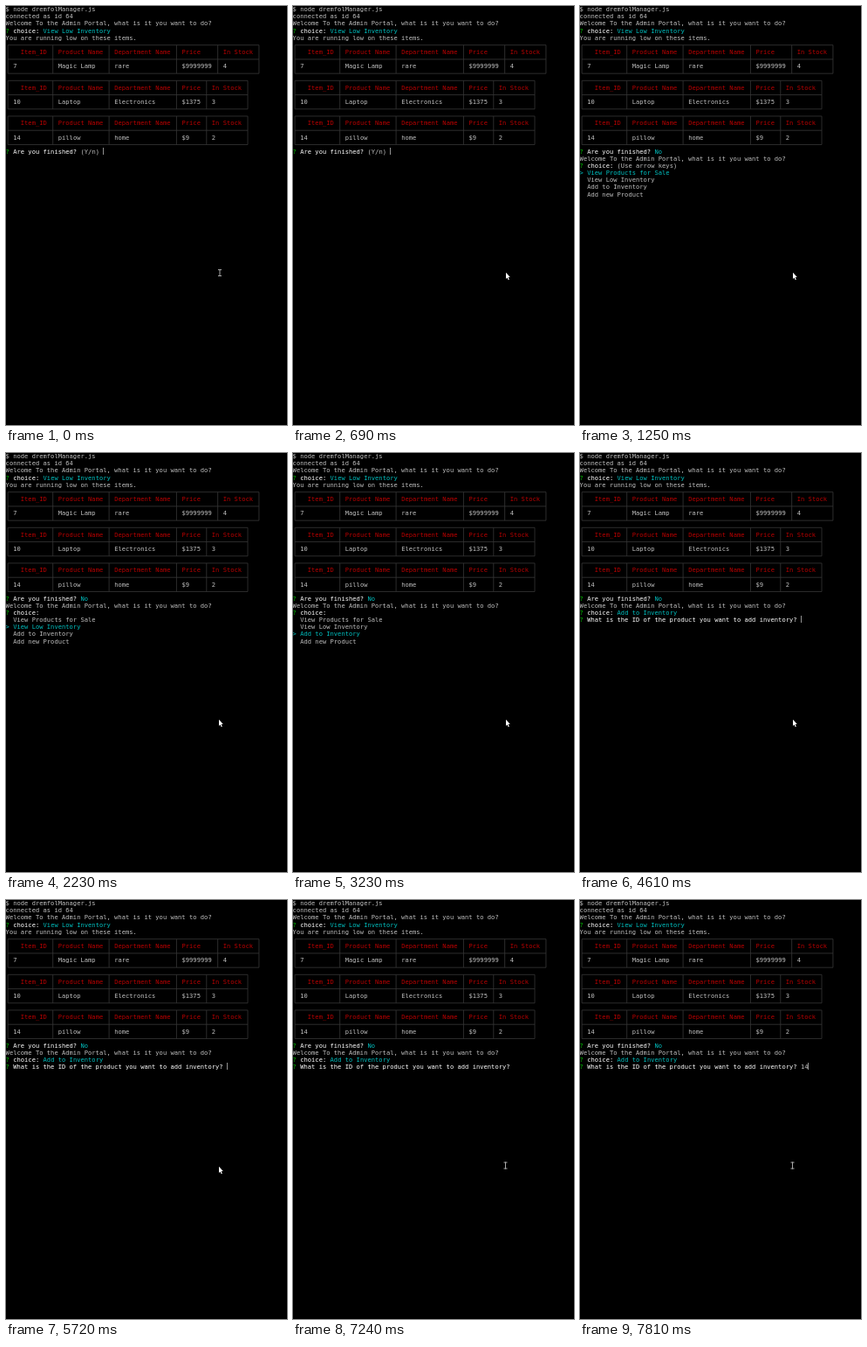
Animation of 322x479 px, one loop 8000 ms. Source, as an HTML page with a canvas:

```html
<!DOCTYPE html>
<html lang="en">
<head>
<meta charset="utf-8">
<title>Terminal</title>
<style>
  html, body { margin: 0; width: 100%; height: 100%; overflow: hidden; background: #000; }
  canvas { display: block; }
</style>
</head>
<body>
<canvas id="stage" width="322" height="479"></canvas>
<script>
const ctx = document.getElementById('stage').getContext('2d');
const LOOP = 8000, COL = 4.295, ROW = 8.13, ZOOM = 10;
const GREY = '#bfbfbf', WHITE = '#fff', GREEN = '#00bf00', CYAN = '#00bfbf', RED = '#b80000', LINE = '#383838';

const OPTIONS = ['View Products for Sale', 'View Low Inventory', 'Add to Inventory', 'Add new Product'];
const HEADERS = ['Item_ID', 'Product Name', 'Department Name', 'Price', 'In Stock'];
const TABLES = [
  { top: 5, stock: 56, cells: ['7', 'Magic Lamp', 'rare', '$9999999', '4'] },
  { top: 10, stock: 53, cells: ['10', 'Laptop', 'Electronics', '$1375', '3'] },
  { top: 15, stock: 53, cells: ['14', 'pillow', 'home', '$9', '2'] }
];

// Drawn large and scaled down so that glyph advances stay fractional.
function text(str, col, row, color = GREY) {
  ctx.save();
  ctx.scale(1 / ZOOM, 1 / ZOOM);
  ctx.font = `${7.13 * ZOOM}px "DejaVu Sans Mono", monospace`;
  ctx.fillStyle = color;
  ctx.fillText(str, (col * COL - 0.4) * ZOOM, (6.2 + row * ROW) * ZOOM);
  ctx.restore();
}

function prompt(row, question, answer = '', color = CYAN) {
  text('?', 0, row, GREEN);
  text(question, 2, row, WHITE);
  text(answer, question.length + 3, row, color);
}

function caret(col, row) {
  ctx.fillStyle = '#909090';
  ctx.fillRect(Math.floor(col * COL), Math.floor(row * ROW), 1, 8);
}

function table({ top, stock, cells }) {
  const edges = [0, 12, 27, 45, stock, stock + 11];
  const x = col => (col + 0.5) * COL;
  const y = row => 4 + row * ROW;
  ctx.strokeStyle = LINE;
  ctx.lineWidth = 0.8;
  ctx.beginPath();
  for (const row of [top, top + 2, top + 4]) {
    ctx.moveTo(x(0), y(row));
    ctx.lineTo(x(stock + 11), y(row));
  }
  for (const col of edges) {
    ctx.moveTo(x(col), y(top));
    ctx.lineTo(x(col), y(top + 4));
  }
  ctx.stroke();
  cells.forEach((cell, i) => {
    text(HEADERS[i], i ? edges[i] + 2 : 4, top + 1, RED);
    text(cell, edges[i] + 2, top + 3);
  });
}

function menu(selected, hint) {
  prompt(22, 'choice:', hint, GREY);
  OPTIONS.forEach((name, i) => {
    const on = i === selected;
    text((on ? '> ' : '  ') + name, 0, 23 + i, on ? CYAN : GREY);
  });
}

function arrow(x, y) {
  ctx.fillStyle = WHITE;
  ctx.beginPath();
  [[0, 0], [0, 7.2], [1.6, 5.8], [2.7, 8.6], [3.8, 8.1], [2.7, 5.4], [4.8, 5.2]]
    .forEach(([dx, dy]) => ctx.lineTo(x + dx, y + dy));
  ctx.fill();
}

function beam(x, y) {
  ctx.fillStyle = '#a8a8a8';
  ctx.fillRect(x - 0.5, y - 4, 1, 8);
  for (const dy of [-4, 3]) ctx.fillRect(x - 2, y + dy, 4, 1);
}

function confirmStep(t) {
  if (t >= 970) return prompt(20, 'Are you finished?', 'No');
  prompt(20, 'Are you finished?', '(Y/n)', GREY);
  const typed = t >= 830 ? 'n' : '';
  text(typed, 26, 20);
  if (t < 140 || t >= 690) caret(26 + typed.length, 20);
}

function inventoryStep(t) {
  prompt(22, 'choice:', OPTIONS[2]);
  prompt(23, 'What is the ID of the product you want to add inventory?');
  const typed = t >= 7810 ? '14' : t >= 7380 ? '1' : '';
  text(typed, 59, 23);
  const toggles = [4050, 4610, 5040, 5720, 6140, 6690, 7100, 7380];
  if (toggles.filter(at => t >= at).length % 2 === 0) caret(59 + typed.length, 23);
}

function draw(t) {
  ctx.fillStyle = '#000';
  ctx.fillRect(0, 0, 322, 479);

  text('$ node dremfolManager.js', 0, 0);
  text('connected as id 64', 0, 1);
  text('Welcome To the Admin Portal, what is it you want to do?', 0, 2);
  prompt(3, 'choice:', OPTIONS[1]);
  text('You are running low on these items.', 0, 4);
  TABLES.forEach(table);

  confirmStep(t);
  if (t >= 970) {
    text('Welcome To the Admin Portal, what is it you want to do?', 0, 21);
    if (t < 1950) menu(0, '(Use arrow keys)');
    else if (t < 3640) menu(t < 2660 ? 1 : 2, '');
    else inventoryStep(t);
  }

  if (t >= 280 && t < 6420) arrow(244, 304.7);
  else if (t < 7100) beam(245, 305);
  else beam(243.5, 303.5);
}

const start = performance.now();
function tick() {
  draw((performance.now() - start) % LOOP);
  requestAnimationFrame(tick);
}
tick();
</script>
</body>
</html>
```
